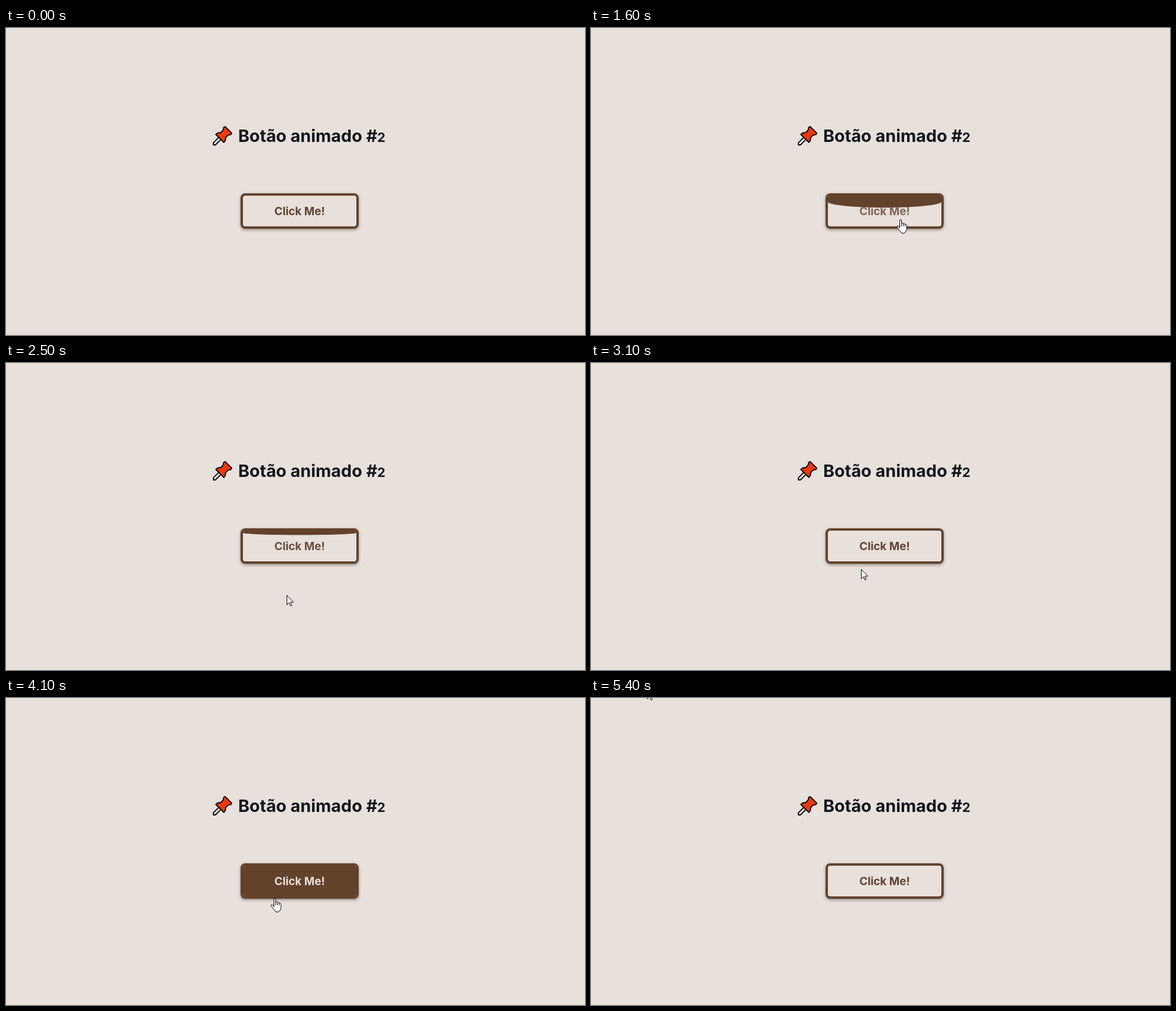
Recreate the animation shown at these times as an HTML page with a canvas. Size 980 by 520 pixels, loop 5600 ms.

```html
<!DOCTYPE html>
<html lang="pt">
<head>
<meta charset="utf-8">
<title>Botão animado</title>
<style>
  html, body { margin: 0; width: 100%; height: 100%; overflow: hidden; background: #e8e0db; }
  canvas { display: block; }
</style>
</head>
<body>
<canvas id="stage" width="980" height="520"></canvas>
<script>
const ctx = document.getElementById('stage').getContext('2d');
const LOOP = 5600, STEP = 100, FADE = 400;
const BG = '#e8e0db', BROWN = '#63422c', INK = '#11161d';
const TEXT_OFF = [94, 67, 52], TEXT_ON = [232, 224, 220];
const BTN = { x: 397, y: 280, w: 200, h: 60, border: 4, radius: 8 };

// Hover intervals of the button: enter, leave
const HOVERS = [[1534, 2236], [3192, 4150]];

const REST = { from: 3400, to: 3600 };

// Turning points of the pointer
const PATH = [
  { t: 300, x: 19, y: -10 },
  { t: 900, x: 240, y: 333 },
  { t: 1200, x: 440, y: 413 },
  { t: 1600, x: 522, y: 324 },
  { t: 2100, x: 518, y: 316 },
  { t: 2500, x: 475, y: 393 },
  { t: 2850, x: 420, y: 380 },
  { t: 3400, x: 506, y: 316 },
  { t: 4000, x: 467, y: 326 },
  { t: 4400, x: 389, y: 383 },
  { t: 4700, x: 290, y: 320 },
  { t: 5400, x: 95, y: -15 }
];

const ARROW = new Path2D('M.5 .5V16.5L4.2 13L6.7 18.6L8.8 17.7L6.4 12.1H11.5Z');
const HAND = new Path2D('M5.5 15V2Q5.5 .5 7 .5T8.5 2V7.5Q9 6 10.2 6.2T11.5 8Q12 7 13.2 7.2T14.5 9' +
  'Q15 8.2 16 8.5T17.5 10.5V15Q17.5 17.5 16 20Q15 23.5 12 23.5H10Q8 23.5 7 21Q4 17.5 1 13.5' +
  'Q.3 11.3 2 11.2Q3.8 11.4 5.5 14');
const KNUCKLES = new Path2D('M8.5 7.5V12M11.5 8V12M14.5 9V12');
const NEEDLE = new Path2D('M0 0L2.5 -2.5H16V2.5H2.5Z');
const PIN_HEAD = new Path2D('M36 -8L33 -8.6Q31 -6 28 -6H23Q21 -9.6 15.5 -9.6V9.6Q21 9.6 23 6H28Q31 6 33 8.6L36 8Z');

// CSS "ease": cubic-bezier(.25, .1, .25, 1)
function ease(p) {
  if (p <= 0) return 0;
  if (p >= 1) return 1;
  const bez = (s, a, b) => 3 * s * (1 - s) ** 2 * a + 3 * s * s * (1 - s) * b + s ** 3;
  let lo = 0, hi = 1;
  for (let i = 0; i < 24; i++) {
    const mid = (lo + hi) / 2;
    if (bez(mid, 0.25, 0.25) < p) lo = mid; else hi = mid;
  }
  return bez(lo, 0.1, 1);
}

function hoverAmount(t) {
  let amount = 0;
  for (const [enter, leave] of HOVERS) {
    if (t >= leave) amount = 1 - ease((t - leave) / FADE);
    else if (t >= enter) amount = ease((t - enter) / FADE);
  }
  return amount;
}

// Smooth curve through the turning points, at rest at both ends
function pointerAt(t) {
  const i = Math.max(PATH.findLastIndex((p, k) => p.t <= t && k < PATH.length - 1), 0);
  const a = PATH[i], b = PATH[i + 1];
  const span = b.t - a.t, u = Math.min((t - a.t) / span, 1);
  const slope = (k, axis) => {
    const prev = PATH[k - 1], next = PATH[k + 1];
    return prev && next ? (next[axis] - prev[axis]) / (next.t - prev.t) : 0;
  };
  const along = axis => Math.round(
    a[axis] + (b[axis] - a[axis]) * u * u * (3 - 2 * u) +
    span * u * (1 - u) * (slope(i, axis) * (1 - u) - slope(i + 1, axis) * u));
  return { x: along('x'), y: along('y') };
}

function outlined(shape, fill, width) {
  ctx.fillStyle = fill;
  ctx.strokeStyle = '#000';
  ctx.lineWidth = width;
  ctx.lineJoin = 'round';
  ctx.fill(shape);
  ctx.stroke(shape);
}

// Draws text and returns the x where it ends
function write(text, x, y, size, color, align = 'left') {
  ctx.font = `700 ${size}px Inter, "Open Sans", sans-serif`;
  ctx.textAlign = align;
  ctx.fillStyle = color;
  ctx.fillText(text, x, y);
  return x + ctx.measureText(text).width;
}

function drawTitle() {
  ctx.save();
  ctx.translate(351, 198);
  ctx.rotate(-Math.PI / 4);
  outlined(NEEDLE, '#e9e6e4', 1.8);
  outlined(PIN_HEAD, '#ea3a10', 1.8);
  ctx.restore();
  const end = write('Botão animado #', 393, 193, 28.8, INK);
  write('2', end, 193, 22, INK); // low, old-style figure
}

function box(inset, radius) {
  ctx.beginPath();
  ctx.roundRect(BTN.x + inset, BTN.y + inset, BTN.w - 2 * inset, BTN.h - 2 * inset, radius);
}

function drawButton(amount) {
  const { border, radius } = BTN;
  const left = BTN.x + border, top = BTN.y + border;
  const width = BTN.w - 2 * border, height = (BTN.h - 2 * border) * 1.8 * amount;

  ctx.save();
  ctx.shadowColor = 'rgba(0,0,0,.4)';
  ctx.shadowBlur = 5;
  ctx.shadowOffsetY = 2;
  ctx.fillStyle = BROWN;
  box(0, radius);
  ctx.fill();
  ctx.restore();

  ctx.save();
  box(border, radius - border);
  ctx.fillStyle = BG;
  ctx.fill();
  ctx.clip();
  if (height > 0) {
    ctx.fillStyle = BROWN;
    ctx.beginPath();
    ctx.rect(left, top, width, height / 2);
    ctx.ellipse(left + width / 2, top + height / 2, width / 2, height / 2, 0, 0, Math.PI);
    ctx.fill();
  }
  ctx.restore();

  const mix = TEXT_OFF.map((c, i) => Math.round(c + (TEXT_ON[i] - c) * amount));
  write('Click Me!', BTN.x + BTN.w / 2, 317, 18.8, `rgb(${mix})`, 'center');
}

function drawPointer(t) {
  if (t < PATH[0].t) return;
  const { x, y } = pointerAt(t);
  const over = x >= BTN.x && x < BTN.x + BTN.w && y >= BTN.y && y < BTN.y + BTN.h;
  ctx.save();
  ctx.translate(over ? x - 5 : x, y);
  outlined(over ? HAND : ARROW, '#fff', 1);
  if (over) ctx.stroke(KNUCKLES);
  ctx.restore();
}

function draw(ms) {
  let t = Math.floor(ms % LOOP / STEP) * STEP;
  if (t >= REST.from && t < REST.to) t = REST.from;
  ctx.fillStyle = BG;
  ctx.fillRect(0, 0, 980, 520);
  drawTitle();
  drawButton(hoverAmount(t));
  drawPointer(t);
}

const start = performance.now();
function tick() {
  draw(performance.now() - start);
  requestAnimationFrame(tick);
}
tick();
</script>
</body>
</html>
```
